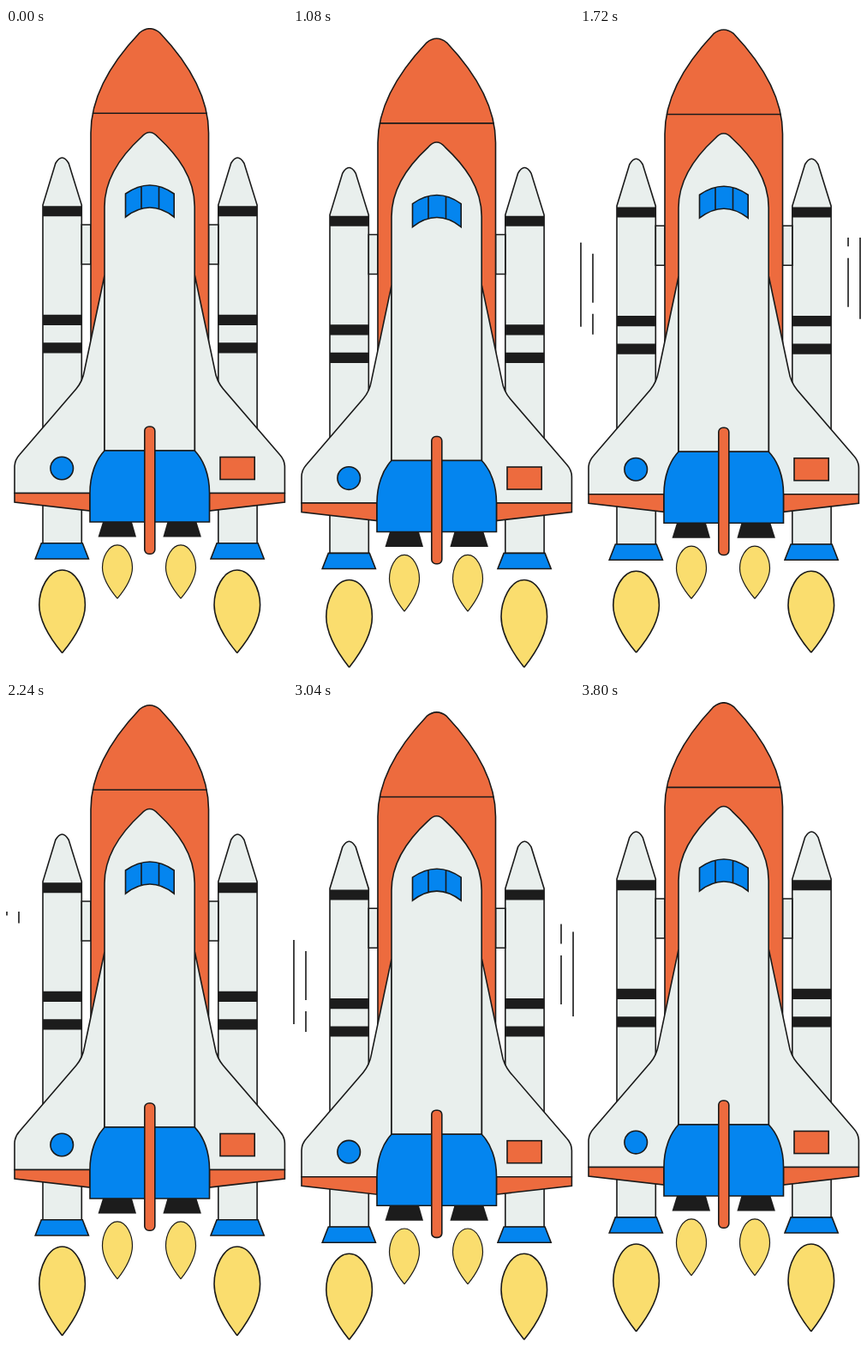
Animation, 328 px wide and 752 px high, one loop 3840 ms. Source, as an HTML page:

```html
<!DOCTYPE html>
<html lang="en">
<head>
<meta charset="utf-8">
<title>Shuttle</title>
<style>
  html, body { margin: 0; width: 100%; height: 100%; overflow: hidden; background: #fff; }
  svg { display: block; width: 328px; height: 752px; }
  .light { fill: #e9efed; }
  .orange { fill: #ed6b3e; }
  .blue { fill: #0485ef; }
  .dark { fill: #1c1c1c; }
  .flame { fill: #fadd6e; }
</style>
</head>
<body>
<svg viewBox="0 0 328 752" fill="none" stroke="#1a1a1a" stroke-width="1.6">
  <defs>
    <clipPath id="window"><rect y="244" width="328" height="508"/></clipPath>
    <g id="booster">
      <path class="light" d="M43 600V206L57.8 157.5Q65.5 144.5 73.2 157.5L88.3 206V600Z"/>
      <path class="dark" stroke="none" d="M43 207.3H88.3V219.3H43ZM43 333.8H88.3V346H43ZM43 366.2H88.3V378.4H43Z"/>
      <path class="blue" d="M41.3 599.8H89.3L96.4 618H34.2Z"/>
    </g>
    <g id="wing">
      <path class="light" d="M115 288L91.5 399Q89.5 411 82 420L16 496.500Q10 503 10 511V541.5H115Z"/>
      <path class="orange" d="M10 541.5H98V562L10 552Z"/>
      <path class="dark" stroke="none" d="M113.300 574H146.700L152 592.500H107.500Z"/>
    </g>
  </defs>

  <g clip-path="url(#window)"><path id="streaks" d="M1 0v98M15 13v57M15 83v24M313 -18.500v23M313 18v57M327 -9.500v98.500"/></g>

  <g id="ship">
    <use href="#booster"/>
    <use href="#booster" x="204.800"/>
    <path class="light" d="M88.300 229H99V275H88.300ZM236.500 229H247.800V275H236.500Z"/>
    <path class="orange" d="M99 430V122C99 75 128 35 156 5.500Q167.700 -4 179.500 5.500C207.500 35 236.500 75 236.500 122V430Z"/>
    <path d="M100.800 99.300H234.700"/>
    <use href="#wing"/>
    <use href="#wing" transform="matrix(-1 0 0 1 335.400 0)"/>
    <path class="light" d="M115 492V208C115 174 135 148 158 127Q167.700 116 177.400 127C200 148 220.200 174 220.200 208V492Z"/>
    <path class="blue" d="M139.500 193Q168 173 196.200 193V220Q168 198 139.500 220ZM158 184.300V210M178.500 184.300V210"/>
    <path class="blue" d="M115 492H220.200C231 503 237.500 521 237.500 541V575H98V541C98 521 104.500 503 115 492Z"/>
    <rect class="orange" x="161.800" y="464" width="12" height="148.200" rx="5"/>
    <circle class="blue" cx="65.200" cy="512.500" r="13.300"/>
    <rect class="orange" x="250" y="499.500" width="40.200" height="26"/>
    <path id="big" class="flame"/>
    <path id="small" class="flame" stroke-width="1.200"/>
  </g>
</svg>
<script>
  const LOOP = 3840, STEP = 40;
  const el = id => document.getElementById(id);
  const [ship, streaks, big, small] = ['ship', 'streaks', 'big', 'small'].map(el);

  // 0 to 1 and back, once per period
  const swing = (t, period) => (1 - Math.cos(2 * Math.PI * t / period)) / 2;
  const zigzag = (t, period) => 1 - Math.abs(1 - 2 * (t / period % 1));

  function flame(x, y, w, h) {
    const side = s => `C${x + s * w * .62} ${y} ${x + s * w} ${y + h * .24} ${x + s * w} ${y + h * .42}` +
      `C${x + s * w} ${y + h * .63} ${x + s * w * .48} ${y + h * .84} ${x} ${y + h}`;
    return `M${x} ${y}${side(1)}M${x} ${y}${side(-1)}`;
  }

  function draw(t) {
    const stretch = .9 + .1 * zigzag(t + 8, 96);
    ship.setAttribute('transform', `translate(0 ${12 * swing(t, 1920)})`);
    streaks.setAttribute('transform', `translate(0 ${-28.6 + 358 * swing(t, 1280)})`);
    big.setAttribute('d', [65.6, 269.8].map(x => flame(x, 631, 26.8, 105.3 * stretch)).join(''));
    small.setAttribute('d', [130, 204].map(x => flame(x, 601.8, 17.5, 68 * stretch)).join(''));
  }

  let start;
  function tick(now) {
    start ??= now;
    draw(Math.floor((now - start) % LOOP / STEP) * STEP);
    requestAnimationFrame(tick);
  }
  draw(0);
  requestAnimationFrame(tick);
</script>
</body>
</html>
```
